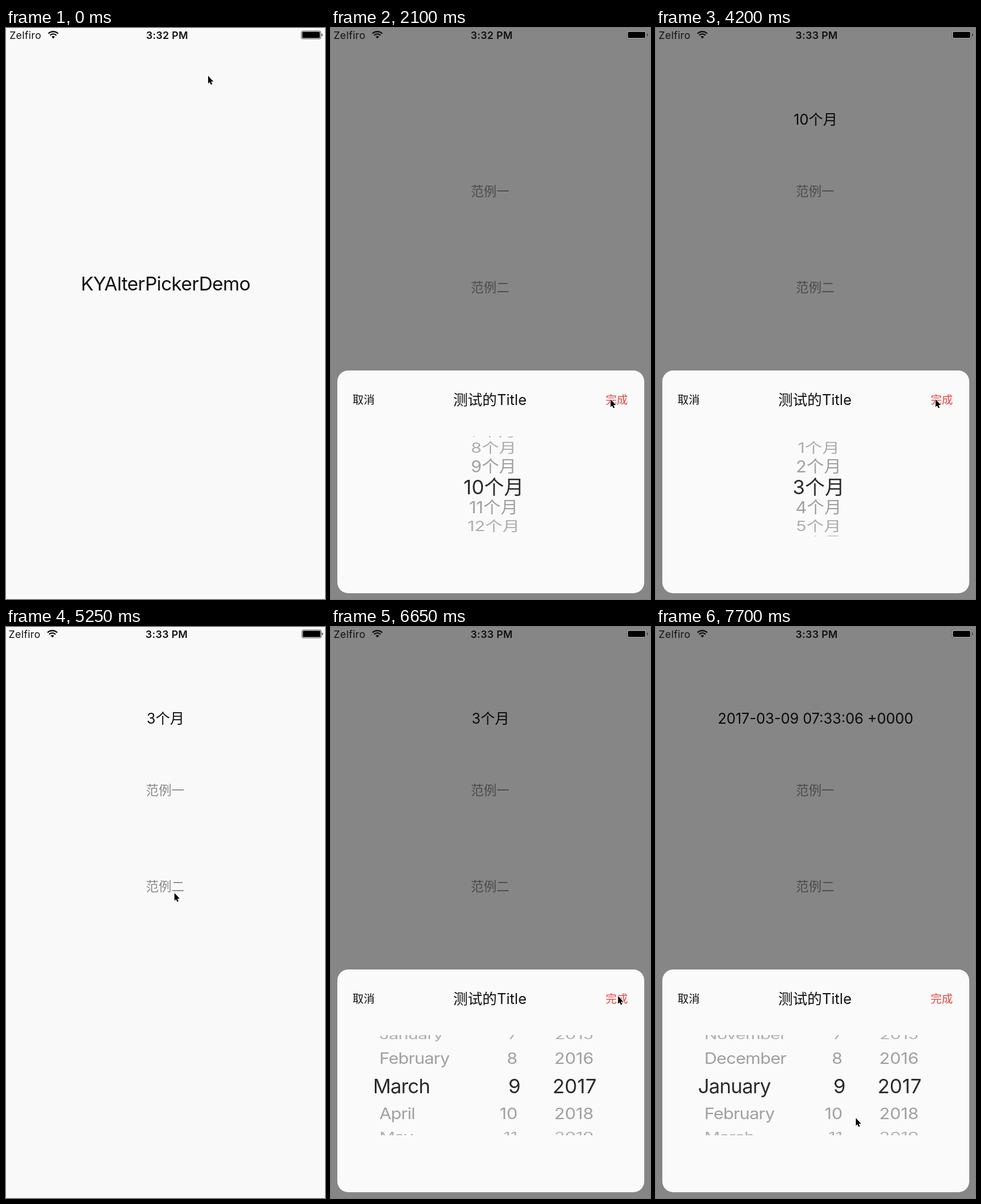
Animation of 554x992 px, one loop 8 s. Source, as an HTML page:

```html
<!DOCTYPE html>
<html lang="zh-CN">
<head>
<meta charset="utf-8">
<title>Picker demo</title>
<style>
  html, body { margin: 0; width: 100%; height: 100%; overflow: hidden; background: #f9f9f9; }
  svg { display: block; width: 100%; height: 100%; }
  text { font-family: Inter, "Noto Sans CJK SC", "Noto Sans CJK", sans-serif; fill: #111; white-space: pre; }
  .mid { text-anchor: middle; }
  .end { text-anchor: end; }
  .status { font-size: 17.6px; letter-spacing: .3px; }
  .clock { font-weight: 600; }
  .splash { font-size: 33px; letter-spacing: -.02em; }
  .result { font-size: 25px; }
  .link { font-size: 22.2px; fill: #8a8a8a; }
  .action { font-size: 19.2px; }
  .title { font-size: 25.3px; }
  .done { fill: #e8443c; }
  .month { letter-spacing: -.025em; }
</style>
</head>
<body>
<svg viewBox="0 0 554 992">
  <defs>
    <clipPath id="window"><rect x="11" y="709" width="533" height="174"/></clipPath>
  </defs>
  <rect width="554" height="992" fill="#f9f9f9"/>

  <text id="splash" class="splash mid" x="277" y="456">KYAlterPickerDemo</text>
  <g id="main">
    <text id="result" class="result mid" x="277" y="168"></text>
    <text class="link mid" x="276.3" y="291.5">范例一</text>
    <text class="link mid" x="276.3" y="458.5">范例二</text>
  </g>
  <rect id="dim" width="554" height="992"/>

  <g id="network">
    <text class="status" x="4.5" y="18.5">Zelfiro</text>
    <g transform="translate(80.5 18.3)" fill="none" stroke="#111" stroke-width="2.3">
      <path d="M-8.5-8.5A12 12 0 0 1 8.5-8.5M-5.6-5.6A8 8 0 0 1 5.6-5.6"/>
      <path d="M0 0L-3-3A4.2 4.2 0 0 1 3-3Z" fill="#111" stroke="none"/>
    </g>
  </g>
  <text id="clock" class="status clock mid" x="279" y="18.5"></text>
  <g id="battery">
    <rect x="514" y="5" width="33.5" height="14" rx="3" fill="#f4f4f4" stroke="#666" stroke-width="1.2"/>
    <rect x="515.5" y="6.5" width="30.5" height="11" rx="1.5" fill="#000"/>
    <path d="M548.8 9.5a2.6 2.6 0 0 1 0 5z" fill="#333"/>
  </g>

  <g id="panel">
    <rect x="11" y="595" width="533" height="387" rx="19" fill="#fafafa"/>
    <text class="action" x="37.5" y="653.3">取消</text>
    <text class="title mid" x="276" y="655">测试的Title</text>
    <text class="action done" x="477" y="653.3">完成</text>
    <g id="wheels" clip-path="url(#window)"></g>
  </g>

  <path id="cursor" d="M0 0V13.5L2.8 10.9 4.9 15.4 7.1 14.4 5.1 10H9.2Z"
        fill="#000" stroke="#fff" stroke-width="1.8" paint-order="stroke"/>
</svg>
<script>
const LOOP = 8000, STEP = 350;
const RADIUS = 115, CENTER = 797;
const MONTHS = 'January February March April May June July August September October November December'.split(' ');
const $ = id => document.getElementById(id);

const monthName = k => MONTHS[(k + 12) % 12];
const monthCount = k => k >= 0 && k < 12 ? `${k + 1}个月` : '';

// One entry per beat: cursor tip, then what differs from the beat before.
const count = (pos, open = 1) => ({ open, count: pos });
const date = (month, open = 1) => ({ open, month });
const show = result => ({ result });
const STAMP = '2017-03-09 07:33:06 +0000';
const beats = [
  [351, 83, { splash: true }],
  [351, 83, show('')],
  [297, 277, {}],
  [294, 279, count(0)],
  [300, 765, count(4.3)],
  [320, 740, count(9)],
  [485.5, 645, {}],
  [485.5, 647, { open: 0, ...show('10个月') }],
  [302, 286, {}],
  [298.5, 278.5, {}],
  [298.5, 278.5, count(0, .6)],
  [305, 868, { ...count(0), clock: '3:33 PM' }],
  [485.5, 645, count(2)],
  [484, 640, { open: 0, ...show('3个月') }],
  [286, 441, {}],
  [292.5, 462, {}],
  [292.5, 462, date(0, .6)],
  [150, 853, date(0)],
  [500, 642, date(2)],
  [498.5, 641, {}],
  [498.5, 642, { open: 0, ...show(STAMP) }],
  [290, 455, {}],
  [347, 853, date(0)]
];

let last = { result: '', open: 0, clock: '3:32 PM' };
const states = beats.map(([x, y, change]) => {
  const base = { ...last, splash: false };
  if ('month' in change) delete base.count;
  return last = { ...base, ...change, x, y };
});

function addWheel({ label, pos, angle, x, pickedX, cls }) {
  const first = Math.ceil(pos - 1.45 / angle);
  for (let k = first; (k - pos) * angle < 1.45; k++) {
    const off = Math.abs(k - pos), a = (k - pos) * angle;
    const picked = off < .5;
    const size = picked ? 34.5 : 30.2;
    const el = document.createElementNS('http://www.w3.org/2000/svg', 'text');
    el.textContent = label(k);
    el.setAttribute('class', cls);
    el.setAttribute('y', size * .365);
    el.style.fontSize = size + 'px';
    el.style.fill = picked ? '#2b2b2b' : off < 1.5 ? '#a0a0a0' : '#adadad';
    el.setAttribute('transform',
      `translate(${picked ? pickedX : x} ${CENTER + RADIUS * Math.sin(a)}) scale(1 ${Math.cos(a)})`);
    $('wheels').append(el);
  }
}

function drawWheels(s) {
  $('wheels').replaceChildren();
  if (!s.open) return;
  if ('count' in s) {
    addWheel({ label: monthCount, pos: s.count, angle: .315, x: 282.5, pickedX: 282.5, cls: 'mid' });
    return;
  }
  const angle = .434;
  addWheel({ label: monthName, pos: s.month, angle, x: 84, pickedX: 73, cls: 'month' });
  addWheel({ label: String, pos: 9, angle, x: 324, pickedX: 329.5, cls: 'end' });
  addWheel({ label: String, pos: 2017, angle, x: 422, pickedX: 423, cls: 'mid' });
}

const move = (id, x, y) => $(id).setAttribute('transform', `translate(${x} ${y})`);
const toggle = (id, on) => $(id).style.display = on ? '' : 'none';

function draw(s) {
  toggle('splash', s.splash);
  toggle('main', !s.splash);
  toggle('panel', s.open);
  $('result').textContent = s.result;
  $('clock').textContent = s.clock;
  $('dim').style.opacity = .462 * s.open;
  move('panel', 0, 397 * (1 - s.open));
  move('network', s.splash ? 1.5 : 0, 0);
  move('clock', s.splash ? .7 : 0, 0);
  move('battery', s.splash ? -1 : 0, 0);
  move('cursor', s.x, s.y);
  drawWheels(s);
}

let shown = -1;
function tick() {
  const beat = Math.floor(performance.now() % LOOP / STEP);
  if (beat !== shown) draw(states[shown = beat]);
  requestAnimationFrame(tick);
}
tick();
</script>
</body>
</html>
```
